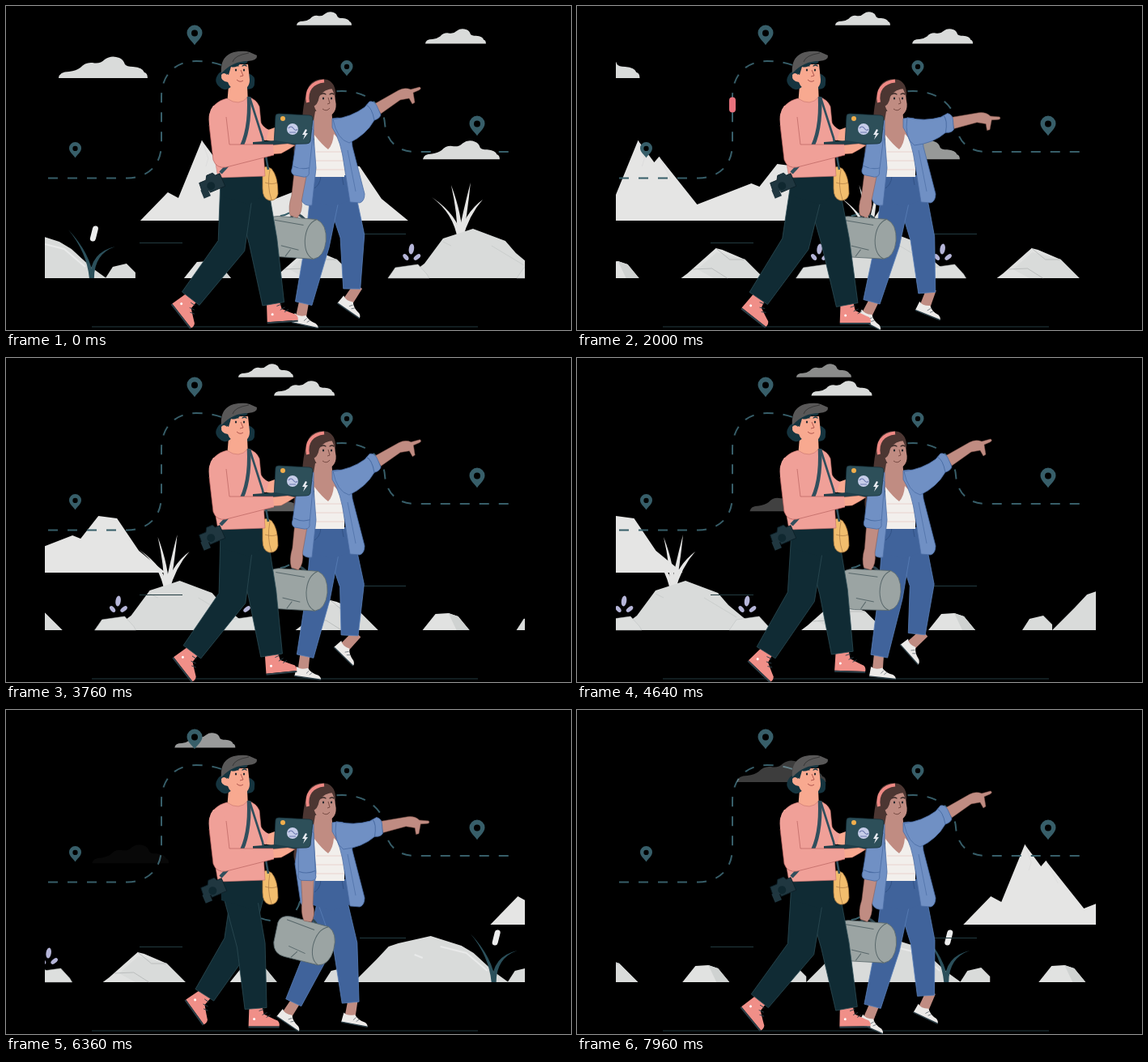
Write an HTML page with a canvas that moves like this. It is 698 px wide and 400 px high and loops after 8 s.

```html
<!DOCTYPE html>
<html lang="en">
<head>
<meta charset="utf-8">
<title>Hikers</title>
<style>
html, body { margin: 0; width: 100%; height: 100%; overflow: hidden; background: #000; }
canvas { display: block; }
</style>
</head>
<body>
<canvas id="stage" width="698" height="400"></canvas>
<script>
const c = document.getElementById('stage').getContext('2d');
const LOOP = 8000, GROUND = 336;
const TEAL = '#375e69', PANTS = '#102b34', SHIRT = '#f0a098', SKIN = '#f8a990', TAN = '#c08c82';
const DENIM = '#40639b', JACKET = '#7090c4', INK = '#263b49', ROCK = '#d9dbda', SNOW = '#e5e5e4';

// ---- helpers ----
function fill(d, color, line, width = 0.8) {
  const path = new Path2D(d);
  c.fillStyle = color;
  c.fill(path);
  if (line) stroke(path, line, width);
}
function stroke(d, color, width = 1) {
  c.strokeStyle = color;
  c.lineWidth = width;
  c.stroke(d instanceof Path2D ? d : new Path2D(d));
}
function ellipse(x, y, rx, ry, color, turn = 0) {
  c.fillStyle = color;
  c.beginPath();
  c.ellipse(x, y, rx, ry, turn, 0, 7);
  c.fill();
}
function at(x, y, degrees, draw) {
  c.save();
  c.translate(x, y);
  c.rotate(degrees * Math.PI / 180);
  draw();
  c.restore();
}
// Rows are [position, value, value, ...].
function sample(rows, p) {
  let i = 1;
  while (i < rows.length - 1 && p > rows[i][0]) i++;
  const a = rows[i - 1], b = rows[i];
  const f = Math.min(1, Math.max(0, (p - a[0]) / (b[0] - a[0])));
  return a.slice(1).map((v, k) => v + (b[k + 1] - v) * f);
}
const smooth = f => (f = Math.min(1, Math.max(0, f)), f * f * (3 - 2 * f));

// ---- scenery ----
function cloud(x, y, width, alpha) {
  if (alpha <= 0) return;
  c.save();
  c.globalAlpha = Math.min(1, alpha);
  c.translate(x, y);
  c.scale(width / 110, width / 110);
  fill('M0 27Q1 19 13 19Q22 18 27 14Q33 7 42 8Q51 10 57 4Q65 -2 75 2Q80 4 82 10Q84 13 92 13Q104 14 106 20Q110 21 110 27Z', ROCK);
  c.restore();
}

function clouds(t, u) {
  cloud(359 - 0.0182 * u, 7, 68, (5950 - t) / 2050);
  cloud(518 - 0.0472 * u, 28, 75, (7700 - t) / 1900);
  cloud(65 - 0.0443 * u, 62, 110, 1);
  cloud(559 - 0.0443 * u, 62, 110, (t - 6850) / 4000);
  cloud(515 - 0.0623 * u, 166, 95, 1 - t / 6600);
}

function mountains(x) {
  at(x, 0, 0, () => {
    fill('M166 265L200 230L213 237L242 166L262 193L268 186L315 245L382 219L392 223L414 195L437 198L464 238L497 265Z', SNOW);
    stroke('M242 166L250 188L247 198M268 186L283 214', '#d9d9d8', 0.7);
  });
}

const boulders = {
  plain: 'M-67 0L-39 -28L-24 -44L-12 -48L28 -57L66 -45L81 -36L106 -13L124 0Z',
  grassy: 'M493 0L517 -18L540 -49L577 -61L617 -46L630 -31L648 -16L670 0Z',
  block: 'M0 0L16 -20L32 -21L44 -17L58 0Z',
  peak: 'M0 0L8 -6L43 -37L51 -35L79 -23L102 0Z',
  pebble: 'M0 0L9 -13L37 -17L48 -5L51 0Z',
  stub: 'M0 0L9 -14L26 -18L37 -7V0Z'
};
function blade(x, y, cx, cy, tx, ty, width, color) {
  fill(`M${x} ${y}Q${cx} ${cy} ${tx} ${ty}Q${cx + width} ${cy + 2} ${x + width} ${y}Z`, color);
}
function sprig(x) {
  ellipse(x - 6, -26, 2.6, 4.5, '#b5b5d8', -0.7);
  ellipse(x + 1, -36, 3.2, 6.5, '#b5b5d8', 0.15);
  ellipse(x + 8, -26, 2.6, 5, '#b5b5d8', 0.9);
}
function peakRock(x) {
  at(x, 0, 0, () => {
    fill(boulders.peak, '#e1e2e1');
    fill('M20 -11L44 -32L79 -23L102 0H40Z', ROCK);
    stroke('M14 -11L38 -12L57 0M43 -37L60 -23L79 -23', '#aeb1b1', 0.7);
  });
}
function blockRock(x) {
  at(x, 0, 0, () => {
    fill(boulders.block, '#e1e2e1');
    fill('M32 -21L44 -17L58 0H42Z', '#cfd2d1');
  });
}
function ground(x) {
  at(x, GROUND, 0, () => {
    fill(boulders.plain, ROCK);
    stroke('M40 -44L72 -36L98 -14M8 -34L18 -30', '#e9eaea', 2);
    blade(103, 0, 100, -32, 77, -60, 5, '#2b505b');
    blade(104, 0, 104, -32, 135, -39, 5, '#2b505b');
    c.lineCap = 'round';
    stroke('M107.5 -49L110.5 -61', '#eceded', 7);
    c.lineCap = 'butt';
    at(123, 0, 0, () => fill(boulders.stub, ROCK));
    blockRock(220);
    peakRock(330);
    for (const [cx, tx, ty] of [[553, 526, -100], [558, 550, -115], [564, 574, -118], [566, 589, -97]])
      blade(558, -48, cx, -80, tx, ty, 6, SNOW);
    fill(boulders.grassy, ROCK);
    stroke('M540 -45L550 -40M600 -40L640 -16', '#c3c7c6', 0.7);
    sprig(500);
    sprig(652);
    for (const px of [472, 631])
      at(px, 0, 0, () => fill(boulders.pebble, '#dddfde', '#b9bdbc', 0.5));
    peakRock(720);
    blockRock(877);
    at(993, 0, 0, () => fill(boulders.stub, ROCK));
  });
}

function pin(x, y, r) {
  at(x, y, 0, () => {
    c.scale(r, r);
    fill('M0 1.4C-.3 .9 -1 .45 -1 -.2A1 1 0 0 1 1 -.2C1 .45 .3 .9 0 1.4Z', TEAL);
    ellipse(0, -0.15, 0.42, 0.42, '#000');
  });
}

const trail = new Path2D('M52 212.5H150C176 212 192 196 192 170V112C192 84 210 68 235 68C280 68 298 90 298 130V225C298 248 310 260 330 260C355 260 365 245 365 220V150C365 120 385 105 415 105C448 105 467 125 468 145C470 168 485 180 505 180H632');
function trailLine(u) {
  c.save();
  c.setLineDash([12, 12]);
  stroke(trail, TEAL, 2);
  // A capsule slides along the trail until the hikers hide it.
  c.lineCap = 'round';
  c.globalAlpha = Math.max(0, Math.min(1, u / 300, (3900 - u) / 300));
  c.setLineDash([11, 5000]);
  c.lineDashOffset = -(0.089 * u + 12);
  stroke(trail, '#e8727d', 8);
  c.restore();
}

// ---- walking ----
// Completed strides by time; each leg runs through positions 0 to 2 per stride.
const strides = [[0, 0.285], [840, 1], [2000, 2.32], [3760, 4.265], [5480, 6.18], [7160, 7.575], [7960, 8.31], [8000, 8.35]];
// position, ankle x, ankle y, foot angle, knee bend
const manSteps = [
  [0, 284, 368, 0, 9], [0.15, 265, 368, 0, 2], [0.36, 246, 366, 15, 1], [0.53, 230, 363, 52, 23],
  [0.62, 226, 359, 52, 23], [0.64, 224, 361, 38, 16], [1, 266, 343, 70, 12], [1.15, 305, 346, 38, 14],
  [1.36, 327, 354, 28, 5], [1.53, 328, 367, -6, 2], [1.64, 334, 369, 0, 2], [2, 284, 368, 0, 9]];
const womanSteps = [
  [0, 420, 376, 0, 9], [0.15, 405, 376, 0, 8], [0.36, 385, 376, 0, 2], [0.53, 368, 376, 8, 3],
  [0.57, 366, 375, 12, 3], [0.64, 362, 373, 28, 4], [1, 342, 364, 40, 10], [1.15, 370, 348, 65, 8],
  [1.36, 401, 344, 60, 17], [1.53, 424, 350, 45, 11], [1.57, 427, 357, 35, 10], [1.64, 433, 362, 22, 6],
  [2, 420, 376, 0, 9]];
// position, hand x, bag angle
const bagSwing = [[0, 380, 12], [0.36, 366, -5], [0.55, 357, 4], [0.64, 355, 3], [1.15, 347, 24], [1.5, 360, 18], [2, 380, 12]];

function leg([hx, hy], [ax, ay, turn, bend], cuff, widths, color, line, shoe) {
  const straight = Math.atan2(ay - hy, ax - hx);
  const kx = (hx + ax) / 2 + bend * Math.sin(straight);
  const ky = (hy + ay) / 2 - bend * Math.cos(straight);
  const upper = Math.atan2(ky - hy, kx - hx), lower = Math.atan2(ay - ky, ax - kx);
  at(ax, ay, turn, shoe);
  const joints = [[hx, hy, upper], [kx, ky, straight],
    [ax - cuff * Math.cos(lower), ay - cuff * Math.sin(lower), lower]];
  const side = s => joints.map(([x, y, a], i) =>
    [x - s * Math.sin(a) * widths[i] / 2, y + s * Math.cos(a) * widths[i] / 2]);
  fill('M' + [...side(1), ...side(-1).reverse()].map(p => p.join(' ')).join('L') + 'Z', color, line);
}
function boot() {
  fill('M-8 -6H7L10 7Q20 12 27 15Q30 18 29 22H-9Z', '#f08f88');
  stroke('M-9 23H29', '#2d4049', 2);
  stroke('M4 3L10 1M8 8L14 5M13 11L18 8', '#2d4049', 0.9);
  ellipse(-2, 13, 1.5, 1.5, '#fff');
}
function sneaker() {
  fill('M-6 -14H6L7 11H-6Z', TAN);
  fill('M-8 6Q-3 10 6 6Q11 12 20 13Q24 15 24 18H-9Z', '#eceae8');
  stroke('M-9 18H24', '#2d4049', 1.4);
  stroke('M8 9L5 13M12 11L9 14', '#56616a', 0.7);
}

function duffel(x, y, turn) {
  at(x, y, turn, () => {
    stroke('M-12 12Q-2 -6 11 10', '#2e4650', 3);
    fill('M-38 17Q-37 7 -24 6L24 7Q37 12 37 33Q36 53 23 56L-20 56Q-34 56 -37 42Z', '#9ba4a3', '#59686b');
    stroke('M24 7Q11 13 11 34Q12 52 23 56M-28 11L8 15M-18 42L4 46M-6 46L-12 55', '#59686b');
  });
}

function face(lashes, blink, x1, x2, y) {
  c.lineCap = 'round';
  if (blink) stroke(`M${x1 - 2} ${y}h4M${x2 - 2} ${y}h4`, INK, 0.9);
  else for (const x of [x1, x2]) ellipse(x, y, 1.1, 1.5, '#22262c');
  stroke(`M${x1 - 3} ${y - 5}q3 -2 6 0M${x2 - 2} ${y - 5}q3 -2 5 0`, lashes, 1.3);
  c.lineCap = 'butt';
}

function woman(t, p) {
  fill('M371 108C373 93 386 88 397 91C409 96 408 110 406 118L385 150L366 140Q367 122 371 108Z', '#4c3632');
  fill('M359 166Q353 176 357 188L364 186V166Z', '#4c3632');
  for (const offset of [1, 0])
    leg([offset ? 409 : 397, 214], sample(womanSteps, (p + offset) % 2), 8, [38, 30, 21],
      DENIM, '#5a7fb8', sneaker);
  fill('M378 209H421L426 240L402 248L376 240Z', DENIM);
  stroke('M389 210Q388 222 379 226M415 210L417 221', '#2f4e80', 0.8);

  fill('M382 130L402 126L404 150L420 168L398 182L377 160Z', TAN);
  fill('M381 159Q390 171 398 177Q404 171 405 158L418 171V211H381Z', '#f2efec');
  stroke('M383 180H418M382 191H418M382 202H418', '#e5c9c4', 0.8);
  fill('M380 111Q381 100 390 100L402 101Q406 108 407 117C410 129 403 137 395 136Q383 135 380 121Z', TAN);
  fill('M379 124Q374 105 382 96Q396 91 405 102Q393 102 387 112Q385 123 379 124Z', '#4c3632');
  stroke('M373 119C370 104 378 94 393 92.5', '#ee8984', 4);
  face('#3a2a28', t > 760 && t < 900, 392, 402, 114);
  stroke('M398 113L400 120L397 121M391 127Q396 131 400 126', '#70453e', 0.9);

  fill('M380 141Q365 146 361 162L357 190L364 238Q368 248 378 246L383 200L380 160Z', JACKET, '#4b6da4');
  fill('M403 139Q416 136 424 143L428 174L443 232Q443 241 437 243L425 242L418 198Q414 166 403 150Z', JACKET, '#4b6da4');
  stroke('M422 178L432 229M369 188L366 226', '#4b6da4', 0.7);

  // Pointing arm sinks and rises again.
  const q = t % 4000;
  const lower = 20 * (smooth((q - 700) / 1050) - smooth((q - 2850) / 1000));
  at(412, 150, lower, () => {
    fill('M43 -29L73 -46Q81 -50 88 -47L99 -50Q102 -48 98 -46L91 -43L93 -31L90 -29L86 -36L75 -34L51 -17Z', TAN, '#85574e', 0.5);
    fill('M-8 -10Q15 -13 31 -25L37 -32Q43 -33 46 -27L51 -16Q50 -11 43 -9Q33 9 12 19Q-3 15 -8 -10Z', JACKET, '#4b6da4');
    stroke('M33 -28Q40 -25 43 -9', '#4b6da4');
  });

  const [handX, bagTurn] = sample(bagSwing, p);
  duffel(handX + 4, 255, bagTurn);
  at(370, 152, Math.asin((368 - handX) / 104) * 180 / Math.PI, () => {
    fill('M-8 50L-8 84Q-11 98 -7 108L2 110Q8 102 5 88L8 50Z', TAN, '#85574e', 0.5);
    fill('M-9 0Q0 -9 10 0L10 51Q12 58 5 59L-8 58Q-13 56 -11 49Z', JACKET, '#4b6da4');
    stroke('M-10 47Q0 51 10 47', '#4b6da4');
  });
}

function man(t, p) {
  for (const offset of [1, 0])
    leg([offset ? 301 : 286, 214], sample(manSteps, (p + offset) % 2), 0, [42, 35, 27],
      PANTS, '#2c4c55', boot);
  fill('M265 208H321L322 232L300 245L266 235Z', PANTS);

  fill('M317 201Q320 196 328 201Q336 210 336 232Q334 241 325 240Q317 238 317 225Z', '#f2bd6d', '#a97842');
  stroke('M320 218Q329 221 335 218M326 202Q322 222 328 239', '#a97842', 0.7);

  fill('M275 98L298 97L299 122H273Z', SKIN);
  fill('M273 114Q255 118 251 136L256 177L262 212L320 210L317 164L313 124Q309 115 299 112Q288 125 273 114Z', SHIRT, '#c6736e', 0.6);
  fill('M321 154L332 150L337 158L333 168L318 165Z', SKIN);
  fill('M313 140Q317 150 325 153L321 166L311 164Z', SHIRT);
  stroke('M300 112Q302 155 288 179Q276 195 265 206', '#304f5d', 4.5);
  stroke('M301 113L317 163L324 202', '#304f5d', 2.6);

  fill('M264 100Q255 93 263 83L274 75L279 99Q270 107 264 100ZM299 83Q309 86 307 95Q308 102 298 103Z', '#15343f');
  fill('M272 72H299L301 91Q301 103 289 104Q277 104 274 94Q265 93 266 85Q269 81 273 85Z', SKIN);
  fill('M270 76L280 69L299 67Q298 73 290 71Q284 77 278 75L275 85Q271 84 270 76Z', '#15343f');
  fill('M266 83C265 67 271 58 287 56Q296 55 301 57L310 61Q311 67 299 68Q280 68 266 83Z', '#595858');
  stroke('M280 69Q282 61 300 58', '#373737');
  face('#15343f', t > 760 && t < 900, 284, 294, 79);
  stroke('M290 79L293 86L289 87M285 91Q289 95 293 92', '#a94f48', 0.9);

  // laptop and near arm
  fill('M333 136Q333 133 337 133L375 135Q379 135 379 139L376 167Q375 170 371 170L331 171Z', '#2d4f59', '#17323b');
  fill('M305 168L333 166L359 170L353 173L305 172Z', '#1f3e49');
  ellipse(342, 139, 3, 3, '#f1ae4c');
  ellipse(354, 152, 7, 7, '#c6cde9');
  stroke('M349 151Q352 147 355 151T360 152M350 156H358', '#6a78ad', 1.2);
  fill('M370 152L366 159H369L367 165L373 157H370L372 153Z', '#e6e9ef');
  fill('M327 172L348 170L357 172L349 177L340 182L327 183Z', SKIN, '#b9685b', 0.4);
  fill('M256 123Q270 121 272 138L276 171L330 171L331 184L272 199Q260 201 256 190L251 147Q249 132 256 123Z', SHIRT);
  stroke('M272 137L276 171L330 171M331 184L272 199Q260 201 256 190L251 147', '#b8625f', 0.7);

  const sway = smooth((Math.cos(Math.PI * p) - 0.75) * 4) + smooth(1 - Math.abs(p - 1.15) * 5);
  at(253 + 6 * sway, 219 + 3 * sway, -23, () => {
    fill('M-13 -6H-4L-1 -11H7L9 -7H15V10H-5V7H-14Z', '#203740', '#0d2028');
    ellipse(-1, 3, 5, 5, '#102830');
    fill('M-15 3H-6V14H-15Z', '#203740');
  });
}

function draw(now) {
  const t = now % LOOP;
  const u = t < 840 ? t * 1.238 : t + 200;
  const p = sample(strides, t)[0] % 1 * 2;
  c.fillStyle = '#000';
  c.fillRect(0, 0, 698, 400);
  c.save();
  c.beginPath();
  c.rect(48, 0, 593, 400);
  c.clip();
  for (const k of [0, 929]) mountains(k - 0.0757 * u);
  trailLine(u);
  clouds(t, u);
  for (const k of [0, 1097]) ground(k - 0.0915 * u);
  c.restore();
  pin(233, 35, 9.5);
  pin(85.5, 177, 7.5);
  pin(421, 76, 7.5);
  pin(582, 147, 9.5);
  stroke('M106 396H583M165 292.5H218M437 281.5H494', '#223b40', 1);
  woman(t, p);
  man(t, p);
}

c.lineJoin = 'round';
const start = performance.now();
function tick() {
  draw(performance.now() - start);
  requestAnimationFrame(tick);
}
tick();
</script>
</body>
</html>
```
